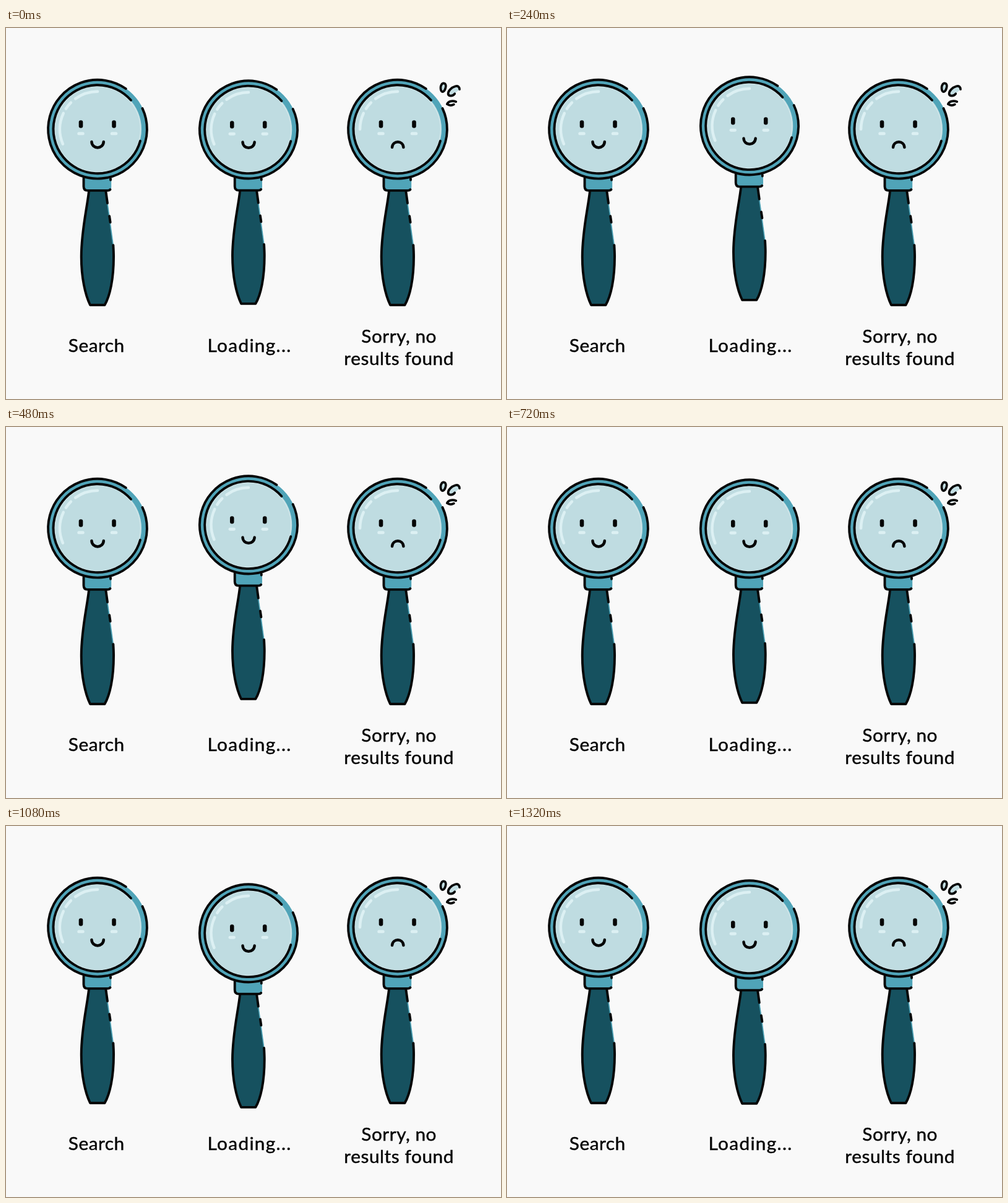
An HTML page for the animation above (1440 ms loop, 800 by 600 pixels).

```html
<!DOCTYPE html>
<html lang="en">
<head>
<meta charset="utf-8">
<title>Search states</title>
<style>
  html, body { margin: 0; width: 100%; height: 100%; overflow: hidden; background: #f9f9f9; }
  svg { display: block; width: 100vw; height: 100vh; }
  .ink { fill: none; stroke: #050505; stroke-width: 3.9; stroke-linecap: round; stroke-linejoin: round; }
  .mouth { stroke-width: 4.5; }
  .shine { fill: none; stroke: #dcf0f3; stroke-width: 4.6; stroke-linecap: round; }
  .drop { fill: #c4dfe4; stroke-width: 3.7; }
  text { font: 29.8px Lato, "Open Sans", sans-serif; letter-spacing: .55px; text-anchor: middle;
         fill: #050505; stroke: #050505; stroke-width: .45; }
  .loose { letter-spacing: 1.3px; }
</style>
</head>
<body>
<svg id="stage" viewBox="0 0 800 600"></svg>
<script>
const RING = '#50a4b8', LENS = '#bfdce1', HANDLE = '#16515f';
const STEP = 120, LOOP = 1440, RISE = 3;
const stage = document.getElementById('stage');

// Arc around the lens centre, clockwise, angles in degrees.
function arc(r, from, to) {
  const at = deg => {
    const a = deg * Math.PI / 180;
    return (r * Math.cos(a)).toFixed(2) + ' ' + (r * Math.sin(a)).toFixed(2);
  };
  return `M${at(from)}A${r} ${r} 0 ${to - from > 180 ? 1 : 0} 1 ${at(to)}`;
}

const path = (cls, d) => `<path class="${cls}" d="${d}"/>`;
const pill = (x, y, w, h, color) =>
  `<rect x="${x - w / 2}" y="${y - h / 2}" width="${w}" height="${h}" rx="${Math.min(w, h) / 2}" fill="${color}"/>`;

// All parts are placed relative to the lens centre.
function handle() {
  const left = 'M-14 100C-17 128-26.3 164-26.3 206C-26.3 240-20 268-12 284.3H11.5';
  const low = 'C20 270 26 242 26 206C26 200 25.7 194 25.3 187.5';
  return `<path d="${left}${low}L13.5 100Z" fill="${HANDLE}"/>` +
    `<path d="M15.8 119L25.1 187" fill="none" stroke="${RING}" stroke-width="1.6"/>` +
    path('ink', left + low) +
    path('ink', 'M13.3 100L16 119.5M19.1 140.5L20.6 150.5');
}

function neck() {
  return `<path d="M-22.5 76H22.2V94Q22 99 16 99H-16Q-22.5 99-22.5 92Z" fill="${RING}"/>` +
    path('ink', 'M-22.5 79V92.5Q-22.5 99.2-16 99.2H16Q19.5 99.2 20.4 97.5M21 80V82');
}

function lens(shineFrom) {
  return `<circle r="80.3" fill="${RING}"/>` +
    `<circle r="71" fill="${LENS}"/>` +
    '<circle r="69.2" fill="none" stroke="#d3e8eb" stroke-width="1.1"/>' +
    path('ink', arc(79.9, -25, 305)) +
    path('ink', arc(71.5, 15.4, 319)) +
    path('shine', arc(61, shineFrom, 205) + arc(61, 213, 225) + arc(61, 234, 270));
}

function face(sad) {
  const parts = [-27, 26.5].map(x =>
    pill(x, -8.2, 6.6, 12.4, '#050505') + pill(x, 7, 11.5, 5, '#dcf0f3')).join('');
  const mouth = sad ? 'M-9 29.3C-8 17.6 8.5 17.6 9.4 29.3' : 'M-9.6 20.3C-9 32.8 9 32.8 9.8 20.3';
  return parts + path('ink mouth', mouth);
}

function glass(x, y, size, sad) {
  return `<g transform="translate(${x} ${y}) scale(${size})">` +
    handle() + neck() + lens(sad ? 180 : 157) + face(sad) + '</g>';
}

const drops = [
  'M704.2 91C701.3 95 702.2 103 705.7 103.2C709.5 102.4 712.4 93.5 709.7 90.4C708 88.7 705.6 89.2 704.2 91Z',
  'M733 99.2C732.8 95.5 730.3 92.8 726.2 94.2C719.7 96 714 102 714.6 107C715.5 110.5 722 110.5 725.2 106.3',
  'M712.8 123C715 118.5 721 116.8 727.3 119.2M712.8 123C716 125.2 720.5 125.4 723.8 123.6'
].map(d => path('ink drop', d)).join('');

const label = (x, y, words, cls = '') => `<text class="${cls}" x="${x}" y="${y}">${words}</text>`;

stage.innerHTML =
  glass(148, 163.7, 1, false) +
  `<g id="bobber">${glass(392, 164.4, .99, false)}</g>` +
  glass(633, 163.7, 1, true) + drops +
  label(146.3, 524, 'Search') +
  label(393.6, 524, 'Loading...', 'loose') +
  label(635.2, 509, 'Sorry, no') +
  label(635.2, 545, 'results found');

const bobber = document.getElementById('bobber');

// Stepped triangle wave: up three steps, down six, back up three.
function draw(ms) {
  const n = Math.floor((ms % LOOP) / STEP);
  const y = RISE * (Math.abs((n + 9) % 12 - 6) - 3);
  bobber.setAttribute('transform', `translate(0 ${-y})`);
}

const start = performance.now();
function tick() {
  draw(performance.now() - start);
  requestAnimationFrame(tick);
}
draw(0);
requestAnimationFrame(tick);
</script>
</body>
</html>
```
